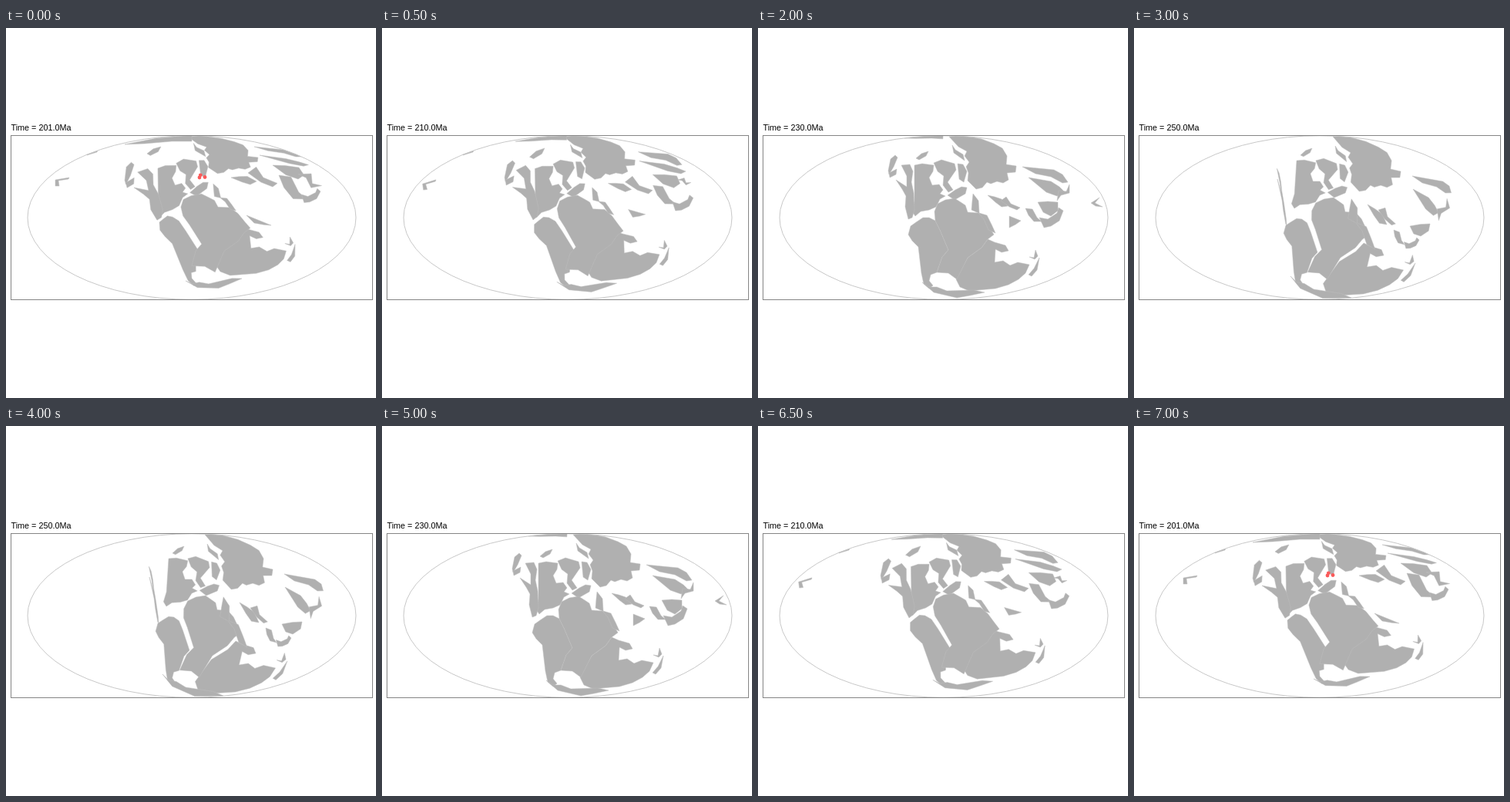
Animation, 480 px wide and 480 px high, one loop 7.5 s. Source, as an HTML page with a canvas:

```html
<!DOCTYPE html>
<html lang="en">
<head>
<meta charset="utf-8">
<title>Drifting plates</title>
<style>
html, body { margin: 0; width: 100%; height: 100%; overflow: hidden; background: #fff; }
canvas { display: block; width: 480px; height: 480px; }
</style>
</head>
<body>
<canvas id="map" width="480" height="480"></canvas>
<script>
const ctx = document.getElementById('map').getContext('2d');
const keyAges = [201, 220, 230, 250];
const ages = [201, 210, 220, 225, 230, 240, 250, 252];
const stepMs = 500;
const plates = [];

const parse = text => text.split(' ').map(p => p.split(',').map(Number));
const mix = (a, b, k) => a.map((v, i) => v + (b[i] - v) * k);

// Two anchors turn and scale a plate, three also shear it
function parseAnchors(text) {
  if (!text) return null;
  const [a, b, c] = parse(text);
  return [a, b, c || [a[0] - b[1] + a[1], a[1] + b[0] - a[0]]];
}

// Each plate is outlined once; its anchors say where it lies at the key ages
function plate(outline, anchors, base = 2) {
  const poses = anchors.map(parseAnchors);
  plates.push({ rings: outline.split('/').map(parse), poses, base: poses[base] });
}

// Siberia and Baltica
plate('248,141 265,139 290,144 306,150 317,156 323,166 322,177 335,179 334,187 323,188 325,197 318,201 310,199 302,202 297,200 291,207 283,209 277,203 272,198 273,188 270,180 274,174 268,166 271,160 260,154',
  ['238,141 326,170 263,188', '238,141 329,178 266,204', '250,141 334,182 272,208', '260,141 345,189 281,210']);

// Northern rim
plate('154,151 195,143 241,139 241,147 215,147 180,150',
  ['154,151 241,142', '194,143 238,141', '190,143 240,141', ''], 0);

// North America, Greenland and western Europe
plate('203,178 213,176 228,178 227,186 222,194 226,204 235,203 240,210 236,215 243,218 236,222 231,232 222,236 211,238 204,244 200,238 203,224/228,175 238,171 255,176 257,184 246,200 253,210 247,213 240,204 241,192 233,186/259,176 266,177 271,186 267,200 261,196/256,210 264,206 271,207 269,215 255,223 246,217/252,152 256,158 266,164 268,172 254,162',
  ['197,182 199,246 261,178', '200,183 202,246 263,182', '203,178 204,244 270,184', '211,172 208,234 277,185']);

// Cordillera
plate('186,178 197,177 201,186 199,200 202,214 203,236 200,246 195,248 191,232 192,218 187,209 179,197 193,206 193,192',
  ['178,185 197,248 166,207', '184,178 197,247 173,206', '192,178 196,247 179,197', '187,186 197,254 186,196']);

// Alaska
plate('170,180 172,170 178,165 181,168 176,180 170,190 169,185/170,188 180,183 179,190 171,194',
  ['156,178 158,205', '170,172 167,198', '172,168 172,192', '']);

// Chukotka
plate('205,169 212,163 221,160 218,166 209,171',
  ['183,163 201,154', '201,172 222,158', '205,169 221,160', '216,165 231,156']);

// South America
plate('195,268 198,257 205,252 214,246 222,246 230,250 236,262 247,288 239,297 232,317 224,320 222,328 227,334 222,338 215,332 212,318 208,284 200,276',
  ['199,252 240,332 250,289', '196,258 230,337 249,288', '198,257 218,336 247,287', '197,256 212,334 238,290']);

// Antarctica, India and Australia
plate('298,274 307,278 321,282 325,289 316,291 308,287 307,304 318,302 327,308 337,304 352,307 347,318 338,326 325,333 308,338 274,341 262,336 257,326 272,298 290,285/351,320 358,312 365,298 362,314 355,322/352,297 358,298 360,288 363,296 359,300',
  ['306,258 364,292 278,316', '303,271 356,302 265,332', '300,275 352,310 262,336', '300,280 349,317 249,342']);

// Africa
plate('230,250 229,238 233,228 243,223 255,221 263,226 269,230 272,239 286,240 294,248 301,260 306,268 298,274 290,285 272,298 258,326 247,318 232,317 239,297 247,288 236,262',
  ['229,239 309,251 264,313', '229,244 302,258 256,323', '230,245 300,259 252,322', '231,244 300,259 245,322']);

// Antarctic peninsula
plate('213,330 222,336 232,336 245,341 280,340 294,343 275,347 258,350 228,343',
  ['233,328 306,325', '220,331 303,338', '213,330 294,343', '203,322 282,350']);

// Turkey and Oman
plate('278,224 279,215 286,224 287,240 297,243 303,255 308,266 299,262 293,248 286,240 277,236',
  ['269,203 295,236', '277,213 300,247', '279,216 304,264', '282,223 308,284']);

// Lhasa
plate('326,244 341,250 334,255 326,259',
  ['312,243 344,256 322,253', '328,227 339,226 329,237', '326,244 341,250 326,259', '']);

// Iran
plate('298,217 307,219 316,222 324,231 316,232 308,226',
  ['292,194 325,199', '295,210 322,221', '298,217 324,231', '303,229 328,255']);

// Tibet
plate('315,224 322,219 328,228 340,233 336,236 326,232',
  ['314,188 352,203', '317,213 350,222', '315,224 340,234', '317,236 339,255']);

// Burma
plate('347,234 356,235 362,246 368,251 358,251 351,243',
  ['354,191 390,222', '349,219 371,235', '347,234 368,251', '337,262 351,281']);

// South China
plate('363,226 376,225 389,226 389,237 380,244 370,239',
  ['346,178 380,181 379,196', '357,204 385,204 378,220', '363,226 389,226 380,244', '358,257 384,254 372,270']);

// Indochina
plate('365,246 376,248 388,240 390,233 396,237 391,250 380,257 371,259',
  ['383,219 408,212', '369,240 399,230', '365,250 396,237', '350,280 370,275']);

// North China
plate('351,194 380,199 391,206 398,213 388,218 374,213',
  ['329,165 390,176 384,179', '339,181 394,193 388,200', '351,194 398,210 386,218', '362,209 395,236 387,243']);

// Amuria
plate('343,180 384,184 395,190 402,200 395,201 380,193 360,189',
  ['322,154 376,162 376,167', '344,168 388,176 390,191', '343,180 395,190 395,201', '361,192 409,205 404,214']);

// Japan
plate('390,211 400,212 404,203 404,214 393,217 388,224',
  ['388,188 402,206', '388,203 392,198', '388,217 404,209', '393,242 408,228']);

// Pacific islands
plate('64,197 82,194 81,196 68,198 69,205 64,205', ['64,197 82,195', '40,208 57,201', '', ''], 0);
plate('432,227 443,220 437,227 447,232 438,231', ['', '433,205 441,209', '432,227 447,232', '']);
plate('104,164 119,159 118,161 105,165', ['104,164 119,159', '', '', ''], 0);

function poseAt(poses, age) {
  const exact = keyAges.indexOf(age);
  if (exact >= 0) return poses[exact];
  const i = age < 220 ? 0 : age < 230 ? 1 : 2;
  const k = (age - keyAges[i]) / (keyAges[i + 1] - keyAges[i]);
  const [a, b] = [poses[i], poses[i + 1]];
  if (!a || !b) return k <= 0.5 ? a : b;
  return a.map((p, n) => mix(p, b[n], k));
}

// Moves a point with its triangle of anchors
function carry([x, y], [a, b, c], [A, B, C]) {
  const [bx, by, cx, cy] = [b[0] - a[0], b[1] - a[1], c[0] - a[0], c[1] - a[1]];
  const [px, py] = [x - a[0], y - a[1]];
  const det = bx * cy - by * cx;
  const u = (px * cy - py * cx) / det;
  const v = (bx * py - by * px) / det;
  return A.map((o, i) => o + u * (B[i] - o) + v * (C[i] - o));
}

function drawPlate({ rings, poses, base }, age) {
  const pose = poseAt(poses, age);
  if (!pose) return;
  for (const ring of rings) {
    ctx.beginPath();
    ring.forEach(p => ctx.lineTo(...carry(p, base, pose)));
    ctx.closePath();
    ctx.fill();
    ctx.stroke();
  }
}

function globe() {
  ctx.beginPath();
  ctx.ellipse(241, 246, 213, 106.3, 0, 0, Math.PI * 2);
}

function dot(x, y) {
  ctx.beginPath();
  ctx.arc(x, y, 2.4, 0, Math.PI * 2);
  ctx.fill();
}

function draw(age) {
  ctx.fillStyle = '#fff';
  ctx.fillRect(0, 0, 480, 480);

  ctx.save();
  globe();
  ctx.clip();
  ctx.fillStyle = '#b0b0b0';
  ctx.strokeStyle = '#bcbcbc';
  ctx.lineWidth = 0.5;
  plates.forEach(p => drawPlate(p, age));
  ctx.restore();

  ctx.lineWidth = 1;
  ctx.strokeStyle = '#c8c8c8';
  globe();
  ctx.stroke();
  ctx.strokeStyle = '#858585';
  ctx.strokeRect(6.5, 139.5, 469, 213);

  if (age === 201) {
    ctx.fillStyle = '#fa5a5a';
    dot(252.3, 190.8);
    dot(251, 194);
    dot(258, 193.5);
  }

  ctx.fillStyle = '#000';
  ctx.font = '10.8px "Liberation Sans", Arial, sans-serif';
  ctx.fillText(`Time = ${age.toFixed(1)}Ma`, 6.5, 133);
}

let shownAge;
function tick() {
  const step = Math.floor(performance.now() / stepMs) % 15;
  const age = ages[Math.min(step, 14 - step)];
  if (age !== shownAge) draw(shownAge = age);
  requestAnimationFrame(tick);
}
tick();
</script>
</body>
</html>
```
